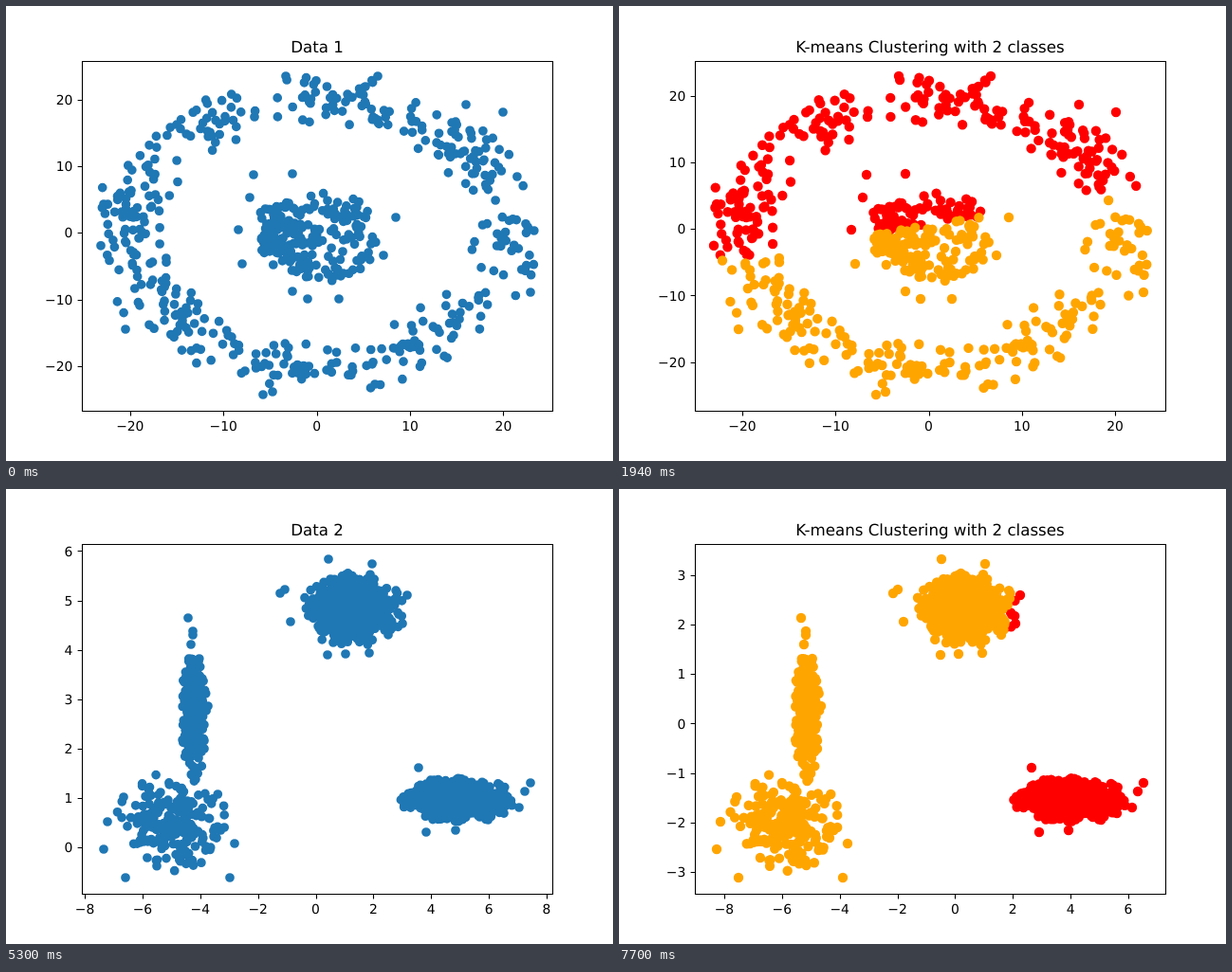
Animation, 640 px wide and 480 px high, one loop 8 s. Source, as an HTML page:

```html
<!DOCTYPE html>
<html lang="en">
<head>
<meta charset="utf-8">
<title>Clustering</title>
<style>
html, body { margin: 0; width: 100%; height: 100%; overflow: hidden; background: #fff; }
svg { display: block; width: 640px; height: 480px; }
text { font-family: "DejaVu Sans", sans-serif; font-size: 13.89px; text-rendering: geometricPrecision; }
.title { font-size: 16.67px; }
.axis { fill: none; stroke: #000; stroke-width: 1.11; }
.dots { fill: none; stroke-linecap: round; }
</style>
</head>
<body>
<svg id="stage" viewBox="0 0 640 480"></svg>
<script>
const NS = 'http://www.w3.org/2000/svg';
const stage = document.getElementById('stage');
const BLUE = '#1f77b4';
const TAU = 2 * Math.PI;

let seed = 7;
function rand() {
  seed = (seed + 0x6d2b79f5) | 0;
  let t = Math.imul(seed ^ (seed >>> 15), 1 | seed);
  t = (t + Math.imul(t ^ (t >>> 7), 61 | t)) ^ t;
  return ((t ^ (t >>> 14)) >>> 0) / 4294967296;
}
function gauss() {
  return Math.sqrt(-2 * Math.log(1 - rand())) * Math.cos(TAU * rand());
}
const times = (n, make) => Array.from({ length: n }, make);

// Normal cloud, cut off at an ellipse of `limit` deviations
function cloud(n, cx, cy, sx, sy, limit) {
  return times(n, () => {
    let a, b;
    do { a = gauss(); b = gauss(); } while (Math.hypot(a, b) > limit);
    return [cx + a * sx, cy + b * sy];
  });
}

function disc(n, cx, cy, rx, ry) {
  return times(n, () => {
    const a = TAU * rand(), r = Math.sqrt(rand());
    return [cx + rx * r * Math.cos(a), cy + ry * r * Math.sin(a)];
  });
}

// Noisy ring whose density rises and falls eight times around
function annulus(n) {
  return times(n, () => {
    let a, g;
    do a = TAU * rand(); while (rand() * 1.45 > 1 + 0.45 * Math.cos(8 * a + 1.1));
    do g = gauss(); while (Math.abs(g) > 2.1);
    const r = 20 + 2 * g;
    return [328 + 9.84 * r * Math.cos(a), 239 - 7.02 * r * Math.sin(a)];
  });
}

// Clouds, each followed by the stray points that set its outline
const ring = [
  ...annulus(430),
  [103, 209], [553, 302], [295, 74], [392, 74], [524, 112], [485, 104],
  [271, 410], [281, 407], [389, 399], [126, 341]
];

const core = [
  ...cloud(60, 288, 239, 13, 18, 2),
  ...disc(150, 333, 243, 64, 48),
  [261, 178], [302, 177], [257, 202], [245, 236], [249, 272], [411, 223],
  [398, 263], [318, 309], [351, 309], [302, 301]
];

const blobs = [
  ...cloud(900, 366, 127, 20, 15, 2.7),
  [340, 74], [386, 79], [289, 110], [294, 106], [423, 112], [418, 142],
  [339, 175], [358, 174], [383, 173], [300, 140],

  ...cloud(800, 476, 328, 24, 10, 2.5),
  [435, 294], [553, 310], [547, 319], [541, 336], [443, 362], [474, 360],

  ...cloud(270, 198, 240, 6.3, 31, 2.2),
  [192, 136], [197, 150], [197, 154], [195, 164], [213, 229],

  ...cloud(200, 177, 353, 26, 23, 2.4),
  [103, 380], [107, 351], [126, 410], [236, 410], [241, 374], [124, 325]
];

function add(parent, tag, attrs, text) {
  const el = document.createElementNS(NS, tag);
  for (const k in attrs) el.setAttribute(k, attrs[k]);
  if (text !== undefined) el.textContent = text;
  parent.appendChild(el);
  return el;
}

const snap = v => Math.floor(v + 0.5) + 0.5;
const label = v => v < 0 ? '\u2212' + -v : '' + v;

// Axis: value range, step, pixel of zero, pixels per unit
function plot({ title, x, y, layers, size = 9.72 }) {
  const g = add(stage, 'g', { display: 'none' });
  for (const [color, pts] of layers) {
    const d = pts.map(p => `M${p[0].toFixed(1)} ${p[1].toFixed(1)}h0`).join('');
    add(g, 'path', { class: 'dots', d, stroke: color, 'stroke-width': size });
  }
  let d = 'M80.5 58.5H576.5V427.5H80.5Z';
  for (let v = x.from; v <= x.to; v += x.step) {
    const px = x.zero + v * x.unit;
    d += `M${snap(px)} 427.5v4.9`;
    add(g, 'text', { x: px, y: 448, 'text-anchor': 'middle' }, label(v));
  }
  for (let v = y.from; v <= y.to; v += y.step) {
    const py = y.zero - v * y.unit;
    d += `M80.5 ${snap(py)}h-4.9`;
    add(g, 'text', { x: 70.3, y: Math.round(py + 5.1), 'text-anchor': 'end' }, label(v));
  }
  add(g, 'path', { class: 'axis', d });
  add(g, 'text', { class: 'title', x: 328, y: 49, 'text-anchor': 'middle' }, title);
  return g;
}

function split(pts, test, a, b) {
  return [[a, pts.filter(test)], [b, pts.filter(p => !test(p))]];
}

const tens = (zero, unit) => ({ from: -20, to: 20, step: 10, zero, unit });
const circles = [...ring, ...core];
const centred = { x: tens(326.5, 9.83), y: tens(235.2, 7.02) };
const kmeans = 'K-means Clustering with 2 classes';

// Each scene with the time it ends
const scenes = [
  [500, plot({
    title: 'Data 1', x: tens(327.6, 9.84), y: tens(239.3, 7.02),
    layers: [[BLUE, circles]]
  })],
  [2900, plot({
    title: kmeans, ...centred, size: 10.4,
    layers: split(circles, p => p[1] < 264 - 0.167 * (p[0] - 130), 'red', 'orange')
  })],
  [5300, plot({
    title: 'Spectral Clustering with 2 classes', ...centred,
    layers: [['green', ring], ['gray', core]]
  })],
  [7700, plot({
    title: 'Data 2',
    x: { from: -8, to: 8, step: 2, zero: 326.5, unit: 30.43 },
    y: { from: 0, to: 6, step: 1, zero: 378.2, unit: 52.13 },
    layers: [[BLUE, blobs]]
  })],
  [8000, plot({
    title: kmeans, size: 10.4,
    x: { from: -8, to: 6, step: 2, zero: 354.4, unit: 30.43 },
    y: { from: -3, to: 3, step: 1, zero: 247.4, unit: 52.13 },
    layers: split(blobs, p => p[0] + 0.25 * p[1] > 443.5, 'red', 'orange')
  })]
];

let shown = null, start = null;
function frame(now) {
  if (start === null) start = now;
  const t = Math.max(0, now - start) % 8000;
  const g = scenes.find(s => t < s[0])[1];
  if (g !== shown) {
    if (shown) shown.setAttribute('display', 'none');
    g.removeAttribute('display');
    shown = g;
  }
  requestAnimationFrame(frame);
}
frame(performance.now());
</script>
</body>
</html>
```
